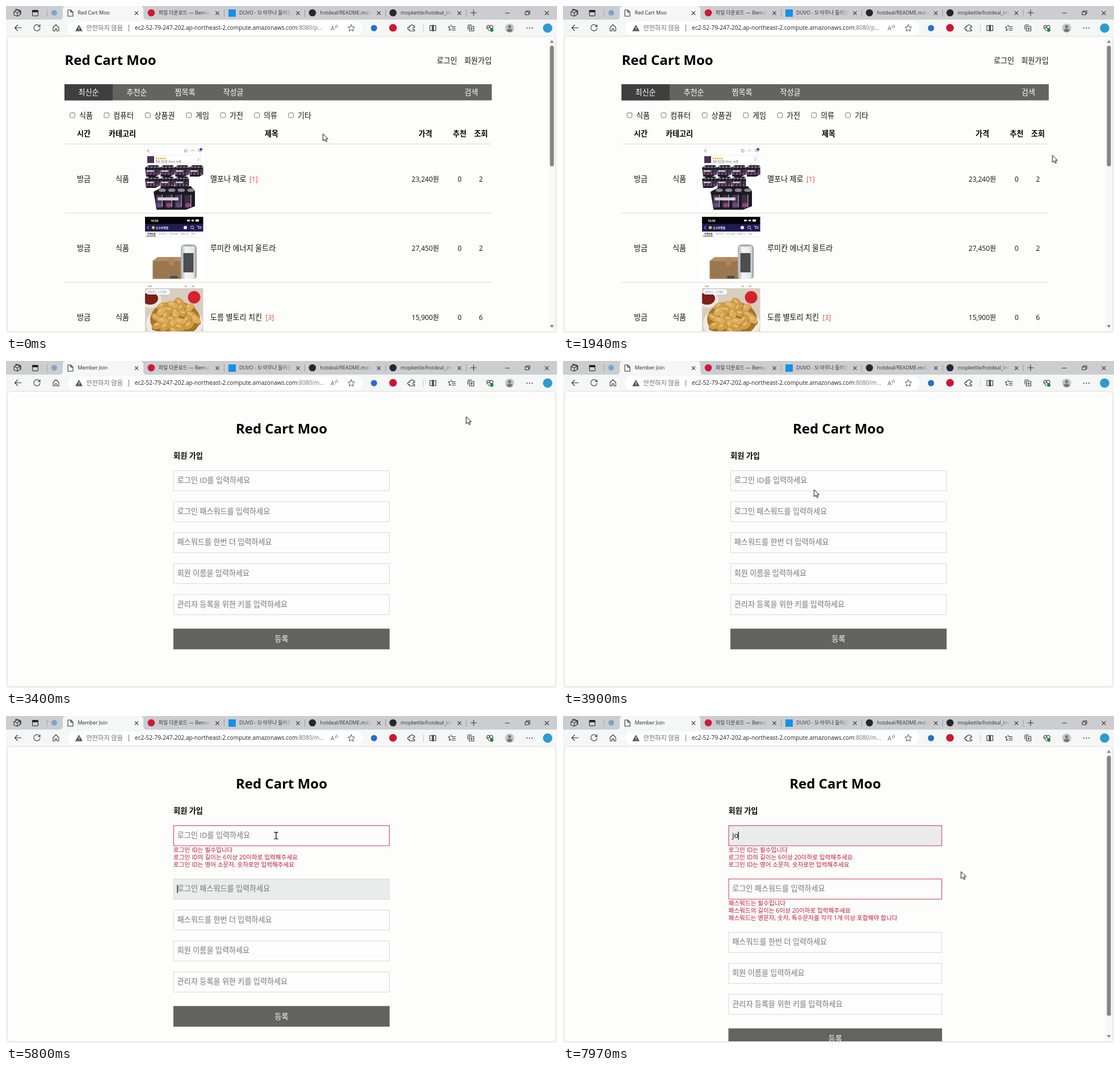
An HTML page that plays this animation: 971 px wide and 577 px high, repeating every 8 s.

```html
<!DOCTYPE html>
<html lang="ko">
<head>
<meta charset="utf-8">
<title>Shop demo</title>
<style>
html, body { margin: 0; width: 100%; height: 100%; overflow: hidden; background: #f4f4f3; }
svg { display: block; font-family: 'Open Sans', 'Noto Sans CJK KR', 'Noto Sans CJK', sans-serif; }
#stage { width: 100vw; height: 100vh; }
text { white-space: pre; }
.line { fill: none; stroke: #333; stroke-linecap: round; stroke-linejoin: round; }
.blink { animation: blink 1s step-end infinite; }
#pointer { animation: move 8s ease-in-out infinite; }
@keyframes blink { 0% { opacity: 1 } 53% { opacity: 0 } }
@keyframes move {
  0%, 8% { transform: translate(558.5px, 225.5px) }
  22%, 25% { transform: translate(862.5px, 263.5px) }
  33% { transform: translate(746.5px, 94.5px) }
  37.5%, 41.5% { transform: translate(826px, 93px) }
  48.75%, 49.5% { transform: translate(442.5px, 227px) }
  53%, 54.5% { transform: translate(462px, 211px) }
  58%, 67% { transform: translate(485px, 268px) }
  72.5%, 74.5% { transform: translate(476px, 211px) }
  80%, 83% { transform: translate(687.5px, 267px) }
  97%, 100% { transform: translate(701.5px, 274.5px) }
}
</style>
</head>
<body>
<svg id="stage" viewBox="0 0 971 577"></svg>
<script>
const LOOP = 8000, OPEN = 3330, FOCUS = 4290, FIRST_ERROR = 4680, SECOND_ERROR = 5900;
const SHOP = 'Red Cart Moo';
let rules = '', spans = 0;

const rect = (x, y, w, h, fill, more = '') =>
  `<rect x="${x}" y="${y}" width="${w}" height="${h}" fill="${fill}" ${more}/>`;
const dot = (x, y, r, fill) => `<circle cx="${x}" cy="${y}" r="${r}" fill="${fill}"/>`;
const oval = (x, y, rx, ry, fill, turn = 0) =>
  `<ellipse cx="${x}" cy="${y}" rx="${rx}" ry="${ry}" fill="${fill}" transform="rotate(${turn} ${x} ${y})"/>`;
const shape = (d, fill) => `<path d="${d}" fill="${fill}"/>`;
const line = (d, width = 1.1, more = '') => `<path class="line" d="${d}" stroke-width="${width}" ${more}/>`;
const text = (x, y, s, size = 13.1, fill = '#111', more = '') =>
  `<text x="${x}" y="${y}" font-size="${size}" fill="${fill}" ${more}>${s}</text>`;
const mid = (x, y, s, size, fill, more = '') => text(x, y, s, size, fill, `text-anchor="middle" ${more}`);
const photo = (y, h, content) =>
  `<svg x="245" y="${y}" width="102.500" height="${h}" viewBox="245 ${y} 102.500 ${h}">${content}</svg>`;
const BOLD = 'font-weight="700"';

// Shows the content only between two times of the loop.
function during(from, to, content) {
  const name = 'span' + spans++, pct = t => t / LOOP * 100 + '%';
  rules += `@keyframes ${name}{0%{opacity:${from ? 0 : 1}}${from ? pct(from) + '{opacity:1}' : ''}` +
    `${pct(to)}{opacity:${to < LOOP ? 0 : 1}}}`;
  return `<g style="animation:${name} 8s step-end infinite">${content}</g>`;
}

const cross = (x, y, r = 2.8) => line(`M${x - r} ${y - r}l${2 * r} ${2 * r}m0 ${-2 * r}l${-2 * r} ${2 * r}`);

function tab(x, title) {
  return `<svg x="${x}" y="0" width="93" height="24">${text(0, 15.3, title, 8.8, '#333')}</svg>` +
    rect(x + 76, 3, 18, 18, 'url(#fade)') + cross(x + 103.5, 12.5) +
    rect(x + 115, 6, 1, 13, '#999c9f');
}

function chrome() {
  return rect(0, 0, 971, 577, '#f4f4f3') + rect(0, 0, 971, 24, '#cbcdd0') +
    shape('M94 24q6 0 6-6V6q0-6 6-6h130q6 0 6 6v12q0 6 6 6z', '#f5f6f6') +
    line('M14 10l5-3 6 2v6l-5 3-6-2zM17 7V5.500l5 1 4 2v6M14 10l6 2v6M20 12l5-3') +
    rect(46.5, 7.5, 10, 10, 'none', 'stroke="#222" rx="1.5"') + rect(46, 7, 11, 4, '#222', 'rx="1.5"') +
    dot(85, 12, 5, '#79a5cb') + rect(72, 6, 1, 13, '#a5a8aa') +
    line('M109 7h5l4 4v7h-9zM114 7v4h4') + cross(230, 12.5) +
    dot(256, 12, 6.3, '#cf1838') + tab(269, '파일 다운로드 — Bemu 가이드') +
    rect(392, 6, 13, 13, '#1492e6') + tab(411, 'DUVO - SI 아무나 들어온다는') +
    dot(540, 12, 6.3, '#24292e') + tab(553.5, 'hotdeal/README.md at main') +
    dot(682, 12, 6.3, '#24292e') + tab(695.5, 'mopkettle/hotdeal_image') +
    line('M819 12h10M824 7v10M880 12.500h7M915 10.500h6v5h-6zM917 10.500v-2h6v5h-2') + cross(953, 12.5, 3.2) +
    toolbar() + rect(2.5, 53.5, 966, 521, '#fdfdfc', 'rx="6" stroke="#dfdfdd"');
}

function toolbar() {
  return rect(0, 24, 971, 29, '#f5f6f6') + rect(109, 27, 519, 24, '#fff', 'rx="12"') +
    line('M27 38.500H16M20.500 33.500l-5 5 5 5M59.500 36a5.500 5.500 0 1 0 .5 3M60 33v3.500h-3.500M83 38l5-5 5 5v6h-3.500v-4h-3v4H83z') +
    shape('M128.500 33l6.500 11.500h-13z', '#555') + rect(128, 37, 1.2, 3.5, '#fff') + rect(128, 41.5, 1.2, 1.2, '#fff') +
    text(141.5, 42.5, '안전하지 않음', 11.2, '#6b6b6b') + rect(216, 33, 1, 12, '#777') +
    text(227, 42.3, 'ec2-52-79-247-202.ap-northeast-2.compute.amazonaws.com', 10.15, '#222') +
    text(572, 43, 'A', 10.5, '#666') + line('M580 35q2 1.500 1 4M582 33q3 2 2 5', 0.8) +
    line('M608.500 33l1.800 3.800 4 .5-3 2.900.8 4.100-3.600-2-3.600 2 .8-4.100-3-2.900 4-.5z', 0.9) +
    dot(648.5, 39, 5.5, '#2371c5') + dot(682, 38.5, 6.8, '#cc1733') +
    line('M711 35h2.500a2 2 0 1 1 4 0h2.500v3a2 2 0 1 0 0 3.500v2.500h-9v-3a2 2 0 1 1 0-3z') +
    rect(735, 32, 1, 14, '#ccc') +
    line('M747 34.500h4v9h-4zM753.500 34.500h4v9h-4zM752.300 33v12') +
    line('M784 33.500l1.300 2.800 3 .4M782.500 36.500l-3 .5 2.200 2.200-.5 3.800 2.800-1.500M786 39.500h6M786 42.500h6M788 36.500h4') +
    line('M814 41v-6q0-1.500 1.500-1.500h5M816.500 36h8v8h-8zM820.500 38v4M818.500 40h4') +
    line('M852 44l-4.500-5q-1-4 2.500-5 2 0 2.500 2 1-2 3-2 4 1.500 2 5.500M848 38.500h3l1-2 1.500 3h3') + dot(856, 42.5, 3, '#1c8b3c') +
    dot(887.5, 39, 8, '#c5c5c5') + dot(887.5, 36.5, 2.8, '#777') + shape('M882.500 44q0-4 5-4t5 4q-5 4-10 0z', '#777') +
    [918, 922.5, 927].map(x => dot(x, 39, 1, '#333')).join('') + dot(954.5, 39, 8.3, '#2c9bd0');
}

const heading = (title, path) => text(126.5, 15.3, title, 8.8, '#222') +
  text(513.5, 42.3, `:8080/${path}...`, 10.15, '#707070');

const scrollbar = height => rect(956.5, 57, 11, 514, '#f8f8f7') + shape('M958.500 65l3.500-5 3.500 5zM958.500 563l3.500 5 3.500-5z', '#858582') +
  rect(958.5, 70, 7, height, '#858582', 'rx="3.5"');

// A shrink-wrapped block of cans: lids on top, striped bodies below.
function pack(x, y, w, h) {
  let s = shape(`M${x} ${y + h * .22}L${x + w * .25} ${y}H${x + w * .9}L${x + w} ${y + h * .2}V${y + h * .8}L${x + w * .7} ${y + h}H${x + w * .08}z`, '#1e1a23');
  for (let i = 0; i < 4; i++) {
    const cx = x + w * (.14 + i * .23);
    s += oval(cx + w * .07, y + h * .16, w * .09, h * .07, '#8b8396') +
      rect(cx - w * .08, y + h * .36, w * .13, h * .5, i % 2 ? '#3a3042' : '#4b3a56') +
      oval(cx, y + h * .76, w * .07, h * .09, i % 2 ? '#9a3c86' : '#6a4785') +
      rect(cx + w * .06, y + h * .34, w * .02, h * .5, '#a9a1b0');
  }
  return s + rect(x + w * .1, y + h * .45, w * .5, h * .12, '#d5ced8', 'rx="1"');
}

function drinkPacks() {
  let s = rect(245, 250, 103, 110, '#fff') +
    line('M252 253l-2.500 2.500 2.500 2.500', 0.8) +
    line('M315 253.500h4v4h-4zM326 256l2.500-2.500 2.500 2.500M338 253h1l1 4h4M338 268l2 2.500-2 2.500', 0.5) +
    dot(343.5, 253, 2.5, '#2952dd') + rect(248, 263.5, 95, 14, 'none', 'stroke="#e2e2e2" stroke-width=".6"') +
    rect(249, 265, 12, 12, '#4a3155') + text(264, 276, '탄산 포도맛 355ml, 24개', 4.2, '#333');
  for (let i = 0; i < 5; i++) s += dot(265 + i * 3.8, 269, 1.5, '#e9b420');
  for (let i = 0; i < 7; i++) s += pack(245 + i % 4 * 25.7, i < 4 ? 281 : 301, 26, 20);
  return photo(250, 109.5, s + pack(260, 318, 73, 44));
}

function canAndBox() {
  return photo(372, 109.5, rect(245, 372, 103, 110, '#fff') +
    rect(245, 372, 103, 13, '#050506') + rect(245, 384.5, 103, 13.5, '#211d53') +
    text(255, 381, '10:56', 5.3, '#fff', BOLD) + rect(319, 377, 5, 3, '#ddd') + rect(327, 377, 4, 3, '#ddd') + rect(334, 376.5, 6, 4, '#fff', 'rx="1"') +
    line('M251.500 388.500l-2.500 2.500 2.500 2.500M330 393l2 2M337 388h1.500l1 4.500h4l.5-3h-5', 0.8, 'style="stroke:#fff"') +
    dot(259.5, 391, 2.7, '#f4bd39') + text(264, 393, '소소마켓몰', 4.8, '#fff', BOLD) + dot(316, 391, 3, '#fff') +
    '<circle cx="328" cy="390.5" r="2.5" fill="none" stroke="#fff" stroke-width=".8"/>' +
    text(249, 404, '전체상품', 4, '#222', BOLD) + text(269, 404, '쇼핑특가    인기상품    브랜드관    기획', 4, '#888') +
    rect(247, 405.5, 17, 1, '#333') + rect(245, 407, 102, .6, '#ddd') +
    shape('M258.500 450l9-7h42v39h-51z', '#9b7750') + shape('M258.500 450l9-7h42v7z', '#b48d62') + rect(287, 443, 9, 15, '#ab865e') +
    shape('M311 421h22l3 5v52l-3 4h-22l-3-4v-52z', 'url(#can)') + oval(322, 422.5, 11, 2, '#a9abab') +
    rect(312.5, 436, 18, 34, '#4b4e4f') + rect(289, 476, 14, 5, '#55504a', 'rx="2.5"'));
}

function chicken() {
  let s = rect(245, 494, 103, 81, '#fff') + rect(250, 494, 7, 1, '#777') + rect(315, 494, 4, 1, '#777') + rect(327, 494, 5, 1, '#777') +
    rect(245, 498, 103, 77, '#d6cebf') + oval(255, 518, 19, 15, '#e9e5dd') + oval(254, 516, 14, 11, '#7d2019') +
    oval(297, 561, 50, 34, '#efece5') + oval(298, 553, 44, 32, '#a8742a');
  // Pieces spread over the mound on a golden-angle spiral, back to front.
  const pieces = Array.from({ length: 24 }, (_, i) => {
    const a = i * 2.4, r = Math.sqrt(i / 24);
    return { x: 298 + 39 * r * Math.cos(a), y: 549 + 27 * r * Math.sin(a), turn: i * 67 % 130 - 65, i };
  }).sort((a, b) => a.y - b.y);
  for (const { x, y, turn, i } of pieces)
    s += oval(x, y + 2, 11, 6.5, '#a06c22', turn) + oval(x, y, 10.5, 6.2, i % 3 ? '#cf9c47' : '#dcae5c', turn) +
      oval(x - 2, y - 2, 4.5, 2, '#e5bd72', turn);
  return photo(494, 81, s + rect(247, 500, 42, 9, '#fff', 'rx="4.5"') + text(250, 506.3, '바삭하고 고소해요!', 4.3, '#3479b8') +
    dot(331.5, 514, 11, '#d4232e'));
}

function listPage() {
  const labels = ['식품', '컴퓨터', '상품권', '게임', '가전', '의류', '기타'];
  const boxes = [112.5, 172.5, 245, 317.5, 377.5, 437.5, 497.5];
  const rows = [
    ['멜포나 제로', 1, '23,240원', 2, 429],
    ['루미칸 에너지 울트라', 0, '27,450원', 2, 0],
    ['도름 별토리 치킨', 3, '15,900원', 6, 457.5]
  ];
  const nav = [[145.5, '최신순'], [230.5, '추천순'], [315.5, '찜목록'], [400.5, '작성글'], [820, '검색']];
  const heads = [[137, '시간'], [205, '카테고리'], [468, '제목'], [739, '가격'], [799.5, '추천'], [837, '조회']];
  return heading(SHOP, 'p') + scrollbar(213) +
    text(103.5, 104, SHOP, 24, '#000', BOLD) + text(759, 100.5, '로그인') + text(807.5, 100.5, '회원가입') +
    rect(103, 138, 753, 28.5, '#636361') + rect(103, 138, 85, 28.5, '#3f3f40') +
    nav.map(([x, s]) => mid(x, 157, s, 13.1, '#fff')).join('') +
    labels.map((s, i) => rect(boxes[i] + .5, 188.5, 8.5, 8.5, '#fff', 'rx="1.5" stroke="#767676"') +
      text(boxes[i] + 16.5, 197.5, s)).join('') +
    heads.map(([x, s]) => mid(x, 230, s, 13.1, '#000', BOLD)).join('') +
    rows.map(([name, count, price, views, at], i) => {
      const y = 310 + i * 122;
      return rect(103, 243 + i * 122, 753, 1, '#d9d9d9') + mid(137, y - .5, '방금') + mid(205, y - .5, '식품') +
        text(360, y - .5, name) + (count ? text(at, y, `[${count}]`, 12, '#df503f') : '') +
        mid(739, y, price, 12) + mid(799.5, y, 0, 12) + mid(837, y, views, 12);
    }).join('') + drinkPacks() + canAndBox() + chicken();
}

const ID_ERRORS = ['로그인 ID는 필수입니다', '로그인 ID의 길이는 6이상 20이하로 입력해주세요', '로그인 ID는 영어 소문자, 숫자로만 입력해주세요'];
const PW_ERRORS = ['패스워드는 필수입니다', '패스워드의 길이는 6이상 20이하로 입력해주세요', '패스워드는 영문자, 숫자, 특수문자를 각각 1개 이상 포함해야 합니다'];
const HINTS = ['로그인 ID를 입력하세요', '로그인 패스워드를 입력하세요', '패스워드를 한번 더 입력하세요', '회원 이름을 입력하세요', '관리자 등록을 위한 키를 입력하세요'];

const caret = (x, y, more = '') => rect(x, y, 1.2, 14, '#000', more);

function joinPage({ errors = [], focus = -1, since = 0, typing = false }) {
  const scrolls = errors.length > 1;
  const x = scrolls ? 291.5 : 295, w = scrolls ? 376.5 : 381, cx = x + w / 2;
  let y = 193, s = mid(cx, 128, SHOP, 24, '#000', BOLD) + text(x, 171.5, '회원 가입', 13.2, '#000', BOLD);
  HINTS.forEach((hint, i) => {
    const on = i === focus, list = errors[i] || [];
    const blink = caret(x + 6.5, y + 11, `class="blink" style="animation-delay:${since % 1000 - 1000}ms"`);
    const empty = text(x + 6.8, y + 22, hint, 13.1, '#757575') + (on ? blink : '');
    s += rect(x + .5, y + .5, w - 1, 35.5, on ? '#eaebeb' : '#fdfdfd', `stroke="${list.length ? '#c23c59' : '#d8d8dc'}"`);
    s += on && typing
      ? during(0, 7650, empty) +
        during(7650, 7830, text(x + 6.8, y + 22, 'j', 12.3, '#000') + caret(x + 10.3, y + 11)) +
        during(7830, LOOP, text(x + 6.8, y + 22, 'jo', 12.3, '#000') + caret(x + 17, y + 11))
      : empty;
    list.forEach((msg, k) => s += text(x, y + 47 + k * 13.1, msg, 10.65, '#bd1734'));
    y += 54.65 + (list.length ? 39.5 : 0);
  });
  return heading('Member Join', 'm') + (scrolls ? scrollbar(459) : '') + s +
    rect(x, y + 6, w, 36.5, '#636361') + mid(cx, y + 29, '등록', 13.1, '#fff');
}

const arrow = '<path d="M0 0V12.500L3 9.800 5 14 7 13.200 5.200 9H9z" fill="#fff" stroke="#000"/>';
const beam = '<path d="M-3.500-6Q0-6 0-4.500 0-6 3.500-6M0-4.500V5M-3.500 6Q0 6 0 4.500 0 6 3.500 6" fill="none" stroke="#111" stroke-width="1.3"/>';

const picture = `<defs>
  <linearGradient id="fade"><stop stop-color="#cbcdd0" stop-opacity="0"/><stop offset=".9" stop-color="#cbcdd0"/></linearGradient>
  <linearGradient id="can"><stop stop-color="#a9abad"/><stop offset=".3" stop-color="#f5f5f5"/><stop offset=".8" stop-color="#e6e7e8"/><stop offset="1" stop-color="#929496"/></linearGradient>
  <clipPath id="view"><path d="M0 0H971V574H0z"/></clipPath></defs>` +
  chrome() + '<g clip-path="url(#view)">' +
  during(0, OPEN, listPage()) +
  during(OPEN, FOCUS, joinPage({})) +
  during(FOCUS, FIRST_ERROR, joinPage({ focus: 0, since: FOCUS })) +
  during(FIRST_ERROR, SECOND_ERROR, joinPage({ errors: [ID_ERRORS], focus: 1, since: FIRST_ERROR })) +
  during(SECOND_ERROR, LOOP, joinPage({ errors: [ID_ERRORS, PW_ERRORS], focus: 0, since: SECOND_ERROR, typing: true })) +
  '</g><g id="pointer">' + during(0, 4000, arrow) + during(4000, 6150, beam) + during(6150, LOOP, arrow) + '</g>';

document.getElementById('stage').innerHTML = `<style>${rules}</style>` + picture;
</script>
</body>
</html>
```
